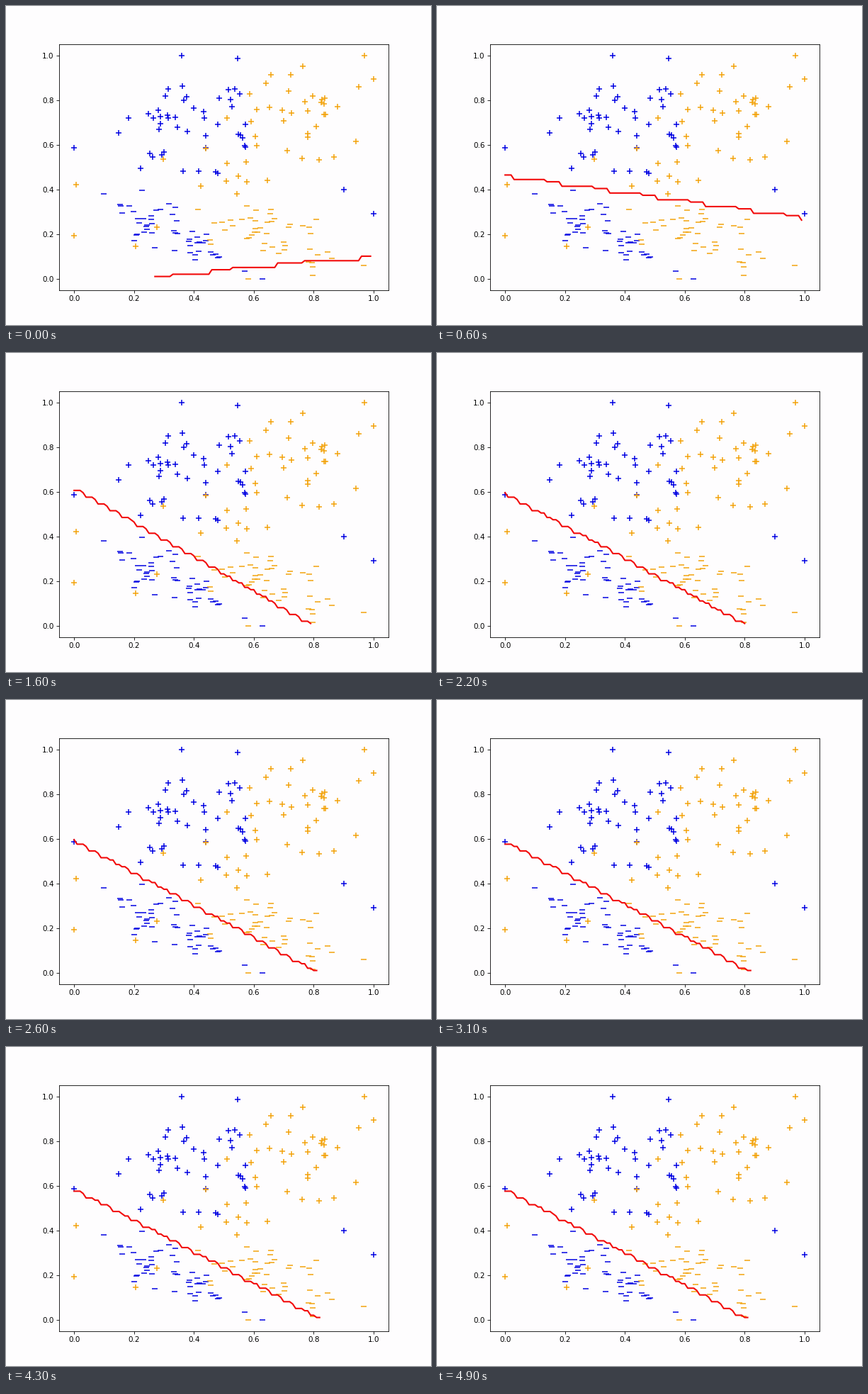
These frames come from a looping animation (600x450 px, 5 s). A matplotlib script:

```python
import numpy as np
import matplotlib.pyplot as plt
from matplotlib.animation import FuncAnimation

FRAMES, INTERVAL = 50, 100
CELLS = 99
BLUE, ORANGE, RED = "#0808e2", "#f3a512", "#f20a0a"
BACKGROUND = "#fefdfe"

# Boundary over time: frame, then start height, slope and bend in grid cells.
KEYS = np.array([
    [0, -3.83, 0.1968, -0.000544],
    [6, 46.53, -0.1875, 0],
    [11, 63.6, -0.791, 0],
    [22, 59.4, -0.7100, -0.0002],
    [31, 58.9, -0.6895, -0.0002],
    [37, 58.8, -0.6757, -0.0002],
    [49, 58.5, -0.6930, -0.0002]])

# The boundary only rests on two of every three grid rows.
LEVELS = np.array([n for n in range(1, CELLS + 1)
                   if (n % 3 if n < 48 else n % 3 != 1)])
COLUMNS = np.arange(100)

rng = np.random.default_rng(12)
fig, ax = plt.subplots(figsize=(8, 6), dpi=75, facecolor=BACKGROUND)
ax.set(xlim=(-0.05, 1.05), ylim=(-0.05, 1.05), facecolor=BACKGROUND)


def cluster(marker, color, count, x_range, y_range, tilt, outliers):
    """Scatter a bounded random cloud; ranges are (low, mode, high)."""
    x = rng.triangular(*x_range, count)
    y = rng.triangular(*y_range, count) + tilt * (x - x_range[1])
    far_x, far_y = np.transpose(outliers)
    ax.scatter(np.append(x, far_x), np.append(y, far_y),
               s=64, marker=marker, color=color, linewidths=1.5)


cluster("+", BLUE, 45, (0.13, 0.38, 0.66), (0.36, 0.67, 0.94), 0,
        [(0, 0.588), (1, 0.29), (0.9, 0.4), (0.36, 1), (0.547, 0.988)])
cluster("_", BLUE, 50, (0.13, 0.33, 0.56), (0.09, 0.22, 0.35), -0.55,
        [(0.1, 0.38), (0.57, 0.035), (0.63, 0)])
cluster("+", ORANGE, 43, (0.36, 0.65, 0.98), (0.36, 0.6, 0.96), 0.2,
        [(0, 0.192), (0.006, 0.42), (0.205, 0.146), (0.277, 0.23),
         (0.298, 0.535), (0.97, 1), (1, 0.895)])
cluster("_", ORANGE, 46, (0.4, 0.6, 0.92), (0.06, 0.21, 0.37), -0.3,
        [(0.582, 0), (0.797, 0.015), (0.968, 0.06)])
boundary, = ax.plot([], [], color=RED, lw=2)


def update(frame):
    start, slope, bend = (np.interp(frame, KEYS[:, 0], part)
                          for part in KEYS[:, 1:].T)
    height = start + slope * COLUMNS + bend * COLUMNS ** 2
    row = np.searchsorted(LEVELS, height, side="right") - 1
    inside = row >= 0
    boundary.set_data(COLUMNS[inside] / 100, LEVELS[row[inside]] / CELLS)
    return boundary,


anim = FuncAnimation(fig, update, frames=FRAMES, interval=INTERVAL,
                     repeat=True, repeat_delay=0)
plt.show()
```
